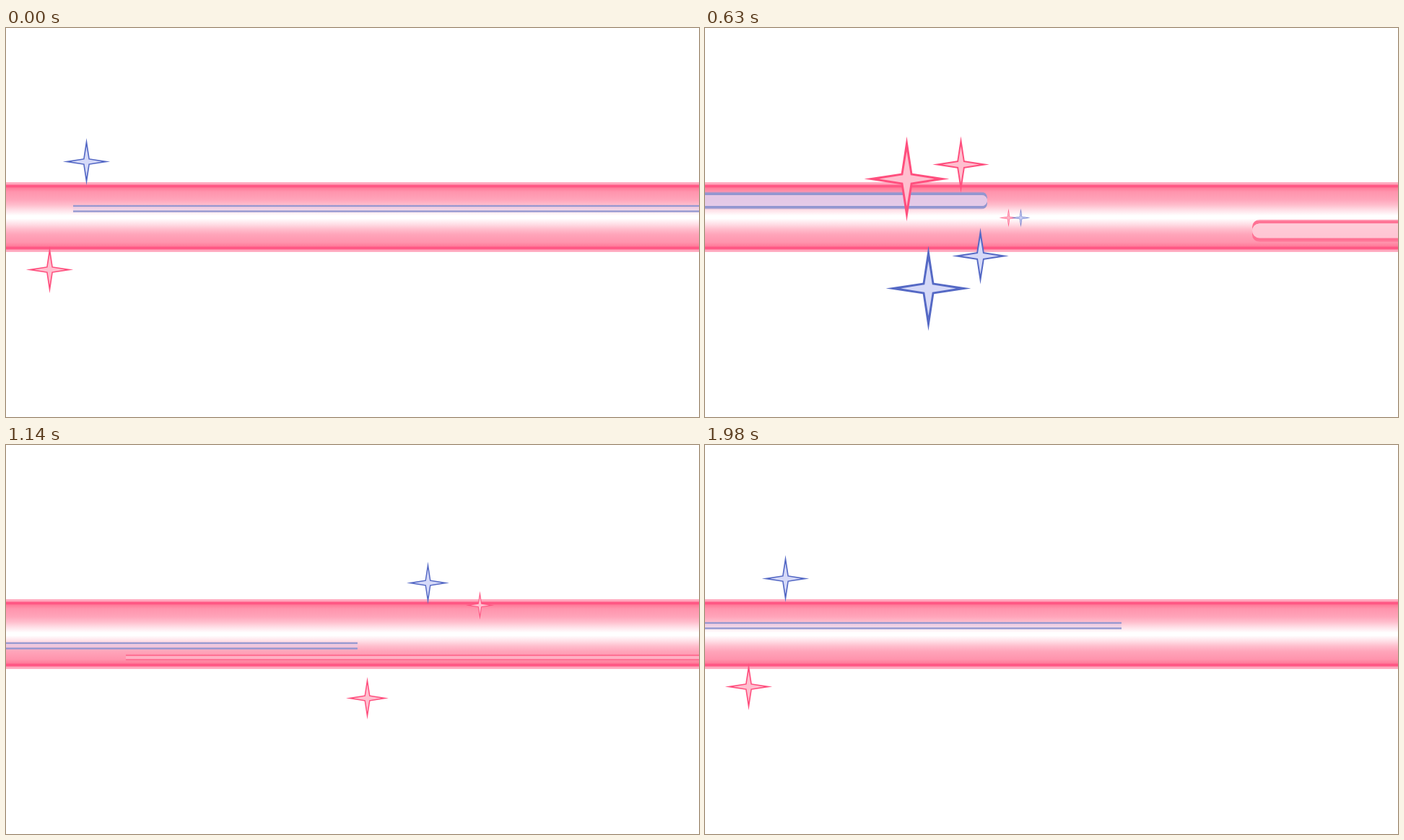
These frames come from a looping animation (960 px wide and 540 px high, 2010 ms). An HTML page with a canvas:

```html
<!DOCTYPE html>
<html lang="en">
<head>
<meta charset="utf-8">
<title>Sparkling tube</title>
<style>
html, body { margin: 0; width: 100%; height: 100%; overflow: hidden; background: #fff; }
canvas { display: block; width: 960px; height: 540px; }
</style>
</head>
<body>
<canvas id="stage" width="960" height="540"></canvas>
<script>
const ctx = document.getElementById('stage').getContext('2d');
const W = 960, H = 540, STEP = 30, LOOP = 2010;
const CYCLE = 66;                 // steps in one sparkle cycle
const BEAT = 3.3, OFFSET = -3.58; // rhythm of star births, in steps
const GROW = 9;                   // steps until a star is full size
const RADIUS = 59;
const SPEED = 84.1;               // streak pixels per step
const TUBE = { mid: 262.5, half: 48.5 };

const PINK = { star: '#ff4f7e', glow: '#ffbfcf', edge: '#ff7194', fill: '#ffcad7' };
const BLUE = { star: '#5569c5', glow: '#d5d9f8', edge: '#9296d0', fill: '#e2cdec' };

// One place per beat; null is a rest.
const pinkStars = [
  [60, 335], null, null, [153, 332], [243, 242], [279, 209], [354, 189], [420, 263],
  null, [458, 313], [500, 351], null, [656, 222], null, [714, 201], null,
  [815, 338], [873, 360], [933, 328]
];
const blueStars = [
  [111, 185], null, [135, 358], [202, 232], [271, 334], [309, 361], [381, 316], [437, 263],
  [510, 184], [544, 174], [584, 191], null, null, [708, 318], [765, 338], [808, 287],
  [845, 196], [897, 179]
];

// enter: the head is at the left border; leave: the tail is there.
const streaks = [
  { enter: -12, leave: -1.11, y: 245.5, h: 10.5, tone: BLUE },
  { enter: 1.4, leave: 11.99, y: 266, h: 31, tone: PINK },
  { enter: 16.36, leave: 26.39, y: 227.5, h: 24, tone: BLUE },
  { enter: 26.28, leave: 36.03, y: 290.5, h: 9, tone: PINK },
  { enter: 32.2, leave: 41.98, y: 273.5, h: 10.5, tone: BLUE },
  { enter: 44.7, leave: 54.5, y: 238.5, h: 11, tone: PINK },
  { enter: 59.14, leave: 69, y: 245.5, h: 10.5, tone: BLUE }
];

// Shades from the middle of the tube to its rim, mirrored.
function tubeGradient() {
  const { mid, half } = TUBE;
  const g = ctx.createLinearGradient(0, mid - half, 0, mid + half);
  const shades = [
    [2, '#ffffff'], [9, '#ffe2e9'], [17, '#ffbdcc'], [24, '#ffa5ba'], [35, '#ff94ad'],
    [40, '#ff7d9b'], [42.5, '#ff5080'], [44, '#ff5c87'], [46, '#ffa6bc'], [half, '#ffb3c6']
  ];
  for (const [d, color] of shades) {
    g.addColorStop((half - d) / (2 * half), color);
    g.addColorStop((half + d) / (2 * half), color);
  }
  return g;
}
const tube = tubeGradient();

function edgeGradient(y, h, edge, color) {
  const g = ctx.createLinearGradient(0, y, 0, y + h);
  const soft = edge * 0.45;
  g.addColorStop(0, color + '70');
  g.addColorStop(soft / h, color);
  g.addColorStop(1 - soft / h, color);
  g.addColorStop(1, color + '70');
  return g;
}

function drawStreak({ enter, leave, y, h, tone }, step) {
  const x = Math.round((step - leave) * SPEED);
  const w = Math.round((leave - enter) * SPEED);
  if (x > W || x + w < 0) return;
  const thick = h > 20;
  const edge = 1.3 + h * 0.135;
  const round = thick ? h / 3 : 0;
  const inner = new Path2D(), ring = new Path2D();
  inner.roundRect(x, y + edge, w, h - 2 * edge, round);
  ring.roundRect(x, y, w, h, round);
  ring.addPath(inner);
  ctx.fillStyle = edgeGradient(y, h, edge, tone.edge);
  ctx.fill(ring, 'evenodd');
  ctx.globalAlpha = thick ? 0.9 : 0.5;
  ctx.fillStyle = tone.fill;
  ctx.fill(inner);
  ctx.globalAlpha = 1;
}

function fillStar(x, y, tip, notch, color) {
  ctx.fillStyle = color;
  ctx.beginPath();
  for (let i = 0; i < 8; i++) {
    const r = i % 2 ? notch * Math.SQRT2 : tip;
    const a = i * Math.PI / 4;
    ctx.lineTo(x + r * Math.cos(a), y + r * Math.sin(a));
  }
  ctx.fill();
}

// Even growth, then a quick collapse.
function starScale(age) {
  if (age < GROW) return (age + 1) / GROW;
  return age === GROW ? 0.5 : 0;
}

function drawStars(places, step, tone) {
  places.forEach((place, i) => {
    const born = Math.round(i * BEAT + OFFSET);
    const scale = starScale((step - born + CYCLE) % CYCLE);
    if (!place || !scale) return;
    const x = place[0] + 0.5, y = place[1] + 0.5, r = RADIUS * scale;
    ctx.globalAlpha = Math.min(1, scale * 4);
    fillStar(x, y, r, r * 0.132, tone.star);
    fillStar(x, y, r * 0.65, r * 0.09, tone.glow);
    ctx.globalAlpha = 1;
  });
}

function draw(step) {
  ctx.fillStyle = '#fff';
  ctx.fillRect(0, 0, W, H);
  ctx.fillStyle = tube;
  ctx.fillRect(0, TUBE.mid - TUBE.half, W, 2 * TUBE.half);
  for (const s of streaks) drawStreak(s, step);
  drawStars(pinkStars, step % CYCLE, PINK);
  drawStars(blueStars, step % CYCLE, BLUE);
}

const start = performance.now();
function tick() {
  const t = (performance.now() - start) % LOOP;
  draw(Math.floor(t / STEP));
  requestAnimationFrame(tick);
}
tick();
</script>
</body>
</html>
```
